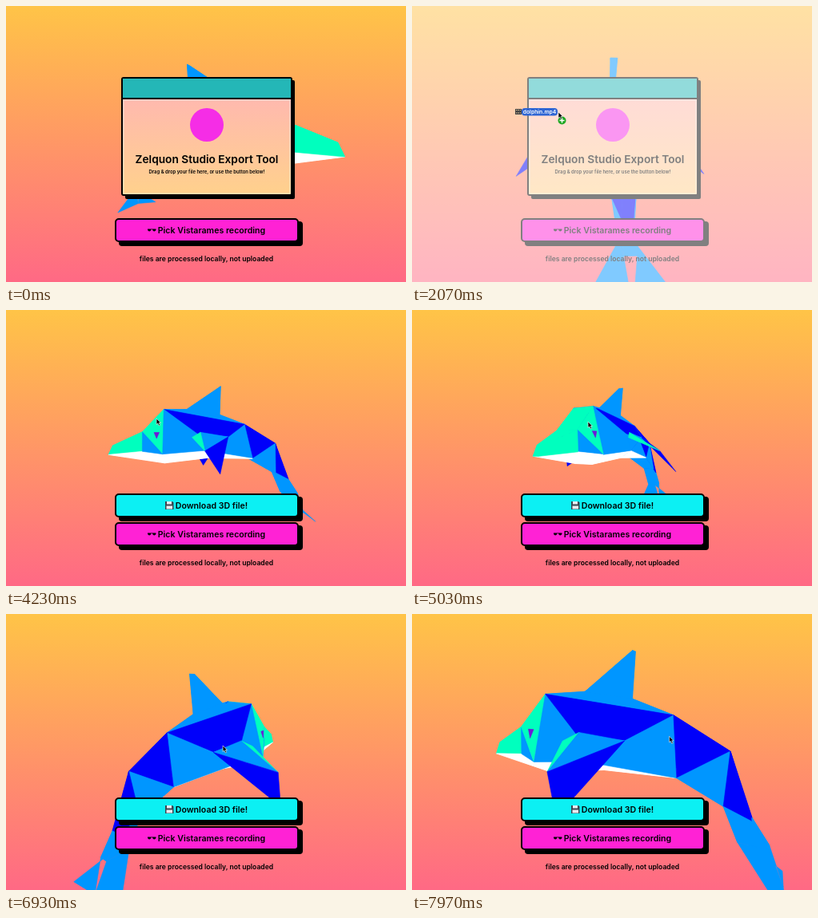
These frames come from a looping animation (500 px wide and 346 px high, 8 s). An HTML page with a canvas:

```html
<!DOCTYPE html>
<html lang="en">
<head>
<meta charset="utf-8">
<title>Export Tool</title>
<style>
html, body { margin: 0; width: 500px; height: 346px; overflow: hidden; }
canvas, svg { position: absolute; left: 0; top: 0; }
canvas { background: linear-gradient(#ffc447, #ff6985); }
text { font-family: Inter, "Open Sans", sans-serif; font-weight: 600; text-anchor: middle; }
</style>
</head>
<body>
<canvas id="model" width="500" height="346"></canvas>
<svg width="500" height="346" viewBox="0 0 500 346">
  <defs>
    <linearGradient id="paper" x2="0" y2="1">
      <stop stop-color="#ffb4b6"/><stop offset="1" stop-color="#ffd18c"/>
    </linearGradient>
  </defs>
  <g id="card">
    <rect x="149" y="93" width="212" height="149" rx="2"/>
    <rect x="145" y="90" width="212" height="147" rx="2" fill="url(#paper)" stroke="#000" stroke-width="2"/>
    <rect x="147" y="118" width="208" height="117" fill="none" stroke="#fff" stroke-opacity=".25" stroke-width="2"/>
    <rect x="146" y="91" width="210" height="24.500" fill="#24b7b7"/>
    <path d="M145 116H357" stroke="#000" stroke-width="2"/>
    <circle cx="251" cy="149" r="21" fill="#f52de6"/>
    <text x="251" y="197" font-size="13.700">Zelquon Studio Export Tool</text>
    <text x="251" y="209.500" font-size="5.900">Drag &amp; drop your file here, or use the button below!</text>
  </g>
  <g id="download">
    <rect x="141" y="234" width="230" height="31" rx="4"/>
    <rect x="137" y="231" width="228" height="28" rx="4" fill="#0cf0f3" stroke="#000" stroke-width="2"/>
    <path d="M199 240h9l1.500 1.500v8.500h-10.500z" fill="#3c4450"/>
    <path d="M201 240h6v3.500h-6zM200.500 245.500h7.500v4h-7.500z" fill="#e8edf2"/>
    <text x="257" y="248.700" font-size="10.600">Download 3D file!</text>
  </g>
  <rect x="141" y="270" width="230" height="31" rx="4"/>
  <rect x="137" y="267" width="228" height="28" rx="4" fill="#ff22d5" stroke="#000" stroke-width="2"/>
  <path d="M177 279.500h10.500v1q-.5 2-2.200 2t-2.200-2.200h-1.700q-.5 2.200-2.200 2.200t-2.200-2z"/>
  <text x="257" y="284.700" font-size="10.600">Pick Vistarames recording</text>
  <text x="250.500" y="319.500" font-size="8.600">files are processed locally, not uploaded</text>
  <rect id="veil" width="500" height="346" fill="#fff" fill-opacity=".5"/>
  <g id="pointer">
    <g id="drag">
      <rect x="-54" y="-4" width="8" height="7" fill="#444"/>
      <path d="M-53-2.500h6M-53 1h6" stroke="#e8c9a0" stroke-dasharray="1.500 1"/>
      <rect x="-46" y="-5" width="45" height="9.500" rx="4" fill="#2f66d4"/>
      <text x="-23.500" y="1.900" font-size="6.800" fill="#fff">dolphin.mp4</text>
      <circle cx="4.500" cy="10.500" r="5" fill="#1ea722"/>
      <path d="M1.500 10.500h6M4.500 7.500v6" stroke="#fff" stroke-width="1.500"/>
    </g>
    <path d="M0 0v7.500l1.700-1.500 1.400 3 1.500-.7-1.400-2.800h2.300z" stroke="#fff" stroke-width=".6"/>
  </g>
</svg>
<script>
const $ = id => document.getElementById(id);
const ctx = $("model").getContext("2d");
const LOOP = 8000, VEIL = 900, DROP = 2450, FOCAL = 410;

// One half of the dolphin; lowercase letters are the mirrored half, digits lie on the centre line.
const points = {
  N: [-113, 3, 4], M: [-118, -8, 4], A: [-77, 19, 16], C: [-77, -4, 17],
  F: [-52, 46, 15], B: [-53, -7, 31], W: [-51, -18, 13], S: [-13, 16, 32],
  Q: [23, 13, 29], L: [56, -13, 14], J: [87, -31, 8], K: [105, -40, 4],
  D: [-6, -3, 33], E: [0, -12, 14],
  G: [-20, 12, 40], R: [-10, 18, 34], H: [-9, -3, 74], X: [5, -26, 86],
  V: [97, -56, 5], U: [117, -58, 4], Y: [128, -88, 32], T: [18, 77, 3],
  Z: [-63, 18, 24], I: [-57, 18, 25], O: [-60, 11, 26],
  1: [127, -84, 0], 2: [17, 42, 0], 3: [-24, 48, 0], 5: [49, 30, 0], 6: [89, 6, 0]
};
const sides = "gNACM gAFB bACB bFSDB dF5QS bSQD bQ5LD d56L b6JL d6KJ bJKUV bVY1U gGRH bRQH dHQX wMCBW wBDEW wDLE pZIO bF325 b3T2".split(" ");
const middle = "gNnaA gAafF bFf3 bTt2 bTt3 dK6k bKkuU bLljJ bJjvV wMmwW wWweE wEelL gNnmM".split(" ");
const faces = [...sides, ...sides.map(f => f[0] + f.slice(1).toLowerCase()), ...middle];
const colors = { g: "#00ffbe", b: "#0096ff", d: "#0000fa", w: "#fff", p: "#7018d8" };
for (const k of Object.keys(points)) {
  const [x, y, z] = points[k];
  if (k > "9") points[k.toLowerCase()] = [x, y, -z];
}

// time, yaw, camera distance, pitch, vertical shift, tail tuck
const views = [
  [0, 156, 303, 0, -3, 1], [830, 204, 303, 2, -3, 0], [DROP, 297, 303, 3, -3, 0],
  [DROP, 6, 410, 0, 0, 0], [4230, 6, 410, 0, 0, 0], [5030, 51, 410, 0, 0, .25],
  [6430, 178, 410, 4, 0, 0], [6930, 228, 318, 16, -4, 0], [LOOP, 338, 260, 8, 0, 0]
];
// time, x, y
const moves = [
  [VEIL, -6, 172], [1230, 36, 167], [2070, 183, 133], [DROP, 187, 135], [4230, 188, 136],
  [5030, 220, 140], [6930, 271, 165], [LOOP, 323, 153]
];

function at(keys, t) {
  let i = 1;
  while (i < keys.length - 1 && keys[i][0] <= t) i++;
  const a = keys[i - 1], b = keys[i], u = Math.max(0, (t - a[0]) / (b[0] - a[0]));
  return a.slice(1).map((v, k) => v + (b[k + 1] - v) * u);
}

function drawModel(t) {
  const [yaw, dist, pitch, shift, tuck] = at(views, t);
  const a = yaw * Math.PI / 180, p = pitch * Math.PI / 180;
  const ca = Math.cos(a), sa = Math.sin(a), cp = Math.cos(p), sp = Math.sin(p);
  const seen = {};
  for (const k in points) {
    let [x, y, z] = points[k];
    const tail = tuck * Math.max(0, x - 80);
    x -= 1.1 * tail;
    y += .55 * tail;
    const depth = z * ca - x * sa, near = depth * cp + y * sp;
    const scale = FOCAL / (dist - near);
    seen[k] = [250 + (x * ca + z * sa) * scale, 173 - shift - (y * cp - depth * sp) * scale, near];
  }
  const order = faces.map(f => {
    const poly = [...f.slice(1)].map(k => seen[k]);
    const depth = poly.reduce((s, v) => s + v[2], 0) / poly.length + (f[0] === "p" ? 9 : 0);
    return { poly, depth, color: colors[f[0]] };
  }).sort((m, n) => m.depth - n.depth);

  ctx.clearRect(0, 0, 500, 346);
  ctx.lineWidth = .6;
  ctx.lineJoin = "round";
  for (const { poly, color } of order) {
    ctx.beginPath();
    poly.forEach(v => ctx.lineTo(v[0], v[1]));
    ctx.closePath();
    ctx.fillStyle = ctx.strokeStyle = color;
    ctx.fill();
    ctx.stroke();
  }
}

const show = (id, on) => $(id).style.display = on ? "" : "none";

function frame(now) {
  const t = now % LOOP, dropped = t >= DROP;
  drawModel(t);
  show("card", !dropped);
  show("download", dropped);
  show("veil", t >= VEIL && !dropped);
  show("drag", !dropped);
  show("pointer", t >= VEIL);
  $("pointer").setAttribute("transform", `translate(${at(moves, t)})`);
  requestAnimationFrame(frame);
}
requestAnimationFrame(frame);
</script>
</body>
</html>
```
